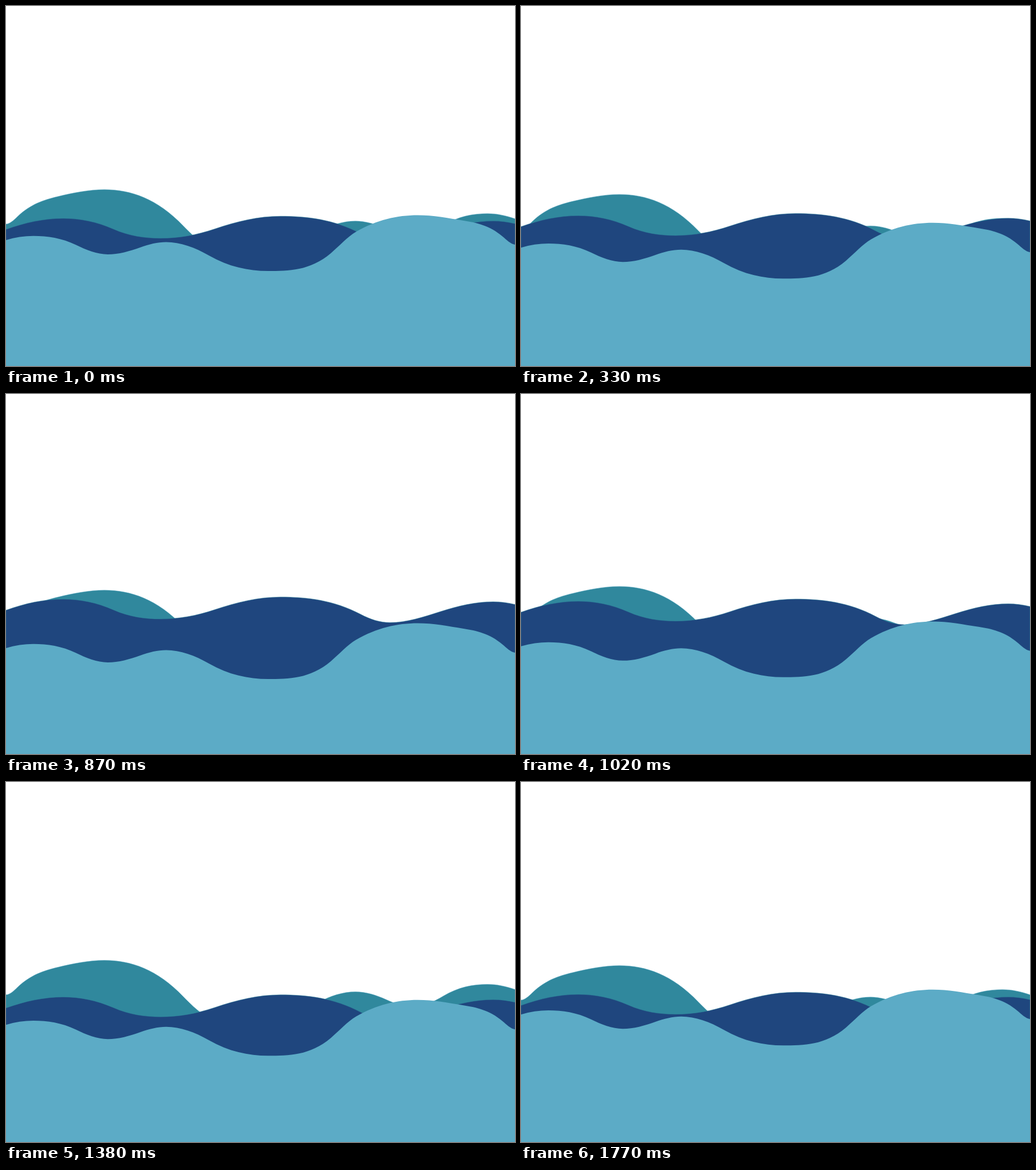
An HTML page with a canvas that plays this animation: 890 by 629 pixels, repeating every 1800 ms.

```html
<!DOCTYPE html>
<html lang="en">
<head>
<meta charset="utf-8">
<title>Waves</title>
<style>
  html, body { margin: 0; width: 100%; height: 100%; overflow: hidden; background: #fff; }
  canvas { display: block; width: 890px; height: 629px; }
</style>
</head>
<body>
<canvas id="stage" width="890" height="629"></canvas>
<script>
const W = 890, H = 629, STEP = 30, COUNT = 60;
const ctx = document.getElementById('stage').getContext('2d');

// knots: [x, y, slope]; crests and troughs have no slope.
// keys: [step, vertical shift], linear in between.
const waves = [
  {
    fill: '#30889d', edge: 'rgba(92,171,198,.5)',
    knots: [[0, 381], [20, 368, -.95], [90, 333, -.24], [172, 320.8], [310, 384.2, 1.04],
      [405, 440], [545, 395, -.55], [611, 375.8], [665, 389.5, .45], [710, 402],
      [765, 383, -.6], [842, 362.7], [W, 371.7, .35]],
    keys: [[0, 0], [30.3, 23], [52, -21.5], [59, 0]]
  },
  {
    fill: '#1f467e', edge: 'rgba(48,136,157,.5)',
    knots: [[0, 390.3, -.36], [100, 371.1], [188, 389.8, .44], [270, 405.7],
      [365, 389.4, -.34], [480, 367.3], [620, 397.5, .53], [671, 412],
      [760, 392.6, -.32], [852, 375.6], [W, 380.3, .25]],
    keys: [[0, 0], [30.3, -13.2], [52, 11.3], [59, 0]]
  },
  {
    fill: '#5cabc6', edge: null,
    knots: [[0, 409, -.3], [48, 401.8], [122, 417.3, .48], [178, 434], [235, 421.8, -.36],
      [280, 412.5], [355, 436, .57], [458, 463], [568, 432, -.84], [612, 394.6, -.58],
      [720, 365.6], [800, 375, .16], [868, 402.5, .85], [W, 417, .15]],
    keys: [[0, 0], [30.5, 36.7], [60, -4.2]]
  }
];

function shiftAt(keys, n) {
  for (let i = 1; i < keys.length; i++) {
    const [a, u] = keys[i - 1], [b, v] = keys[i];
    if (n <= b) return u + (v - u) * (n - a) / (b - a);
  }
  return keys[keys.length - 1][1];
}

function makePath(knots) {
  const path = new Path2D();
  path.moveTo(0, H + 60);
  path.lineTo(knots[0][0], knots[0][1]);
  for (let i = 1; i < knots.length; i++) {
    const [x0, y0, s0 = 0] = knots[i - 1], [x1, y1, s1 = 0] = knots[i];
    const d = (x1 - x0) / 3;
    path.bezierCurveTo(x0 + d, y0 + d * s0, x1 - d, y1 - d * s1, x1, y1);
  }
  path.lineTo(W, H + 60);
  path.closePath();
  return path;
}

for (const wave of waves) wave.path = makePath(wave.knots);

function draw(now) {
  const n = Math.floor(now / STEP) % COUNT;
  ctx.fillStyle = '#fff';
  ctx.fillRect(0, 0, W, H);
  for (const { path, fill, edge, keys } of waves) {
    ctx.save();
    ctx.translate(0, shiftAt(keys, n));
    ctx.fillStyle = fill;
    ctx.fill(path);
    if (edge) {
      ctx.strokeStyle = edge;
      ctx.stroke(path);
    }
    ctx.restore();
  }
}

let start = null;
function tick(now) {
  if (start === null) start = now;
  draw(now - start);
  requestAnimationFrame(tick);
}
draw(0);
requestAnimationFrame(tick);
</script>
</body>
</html>
```
